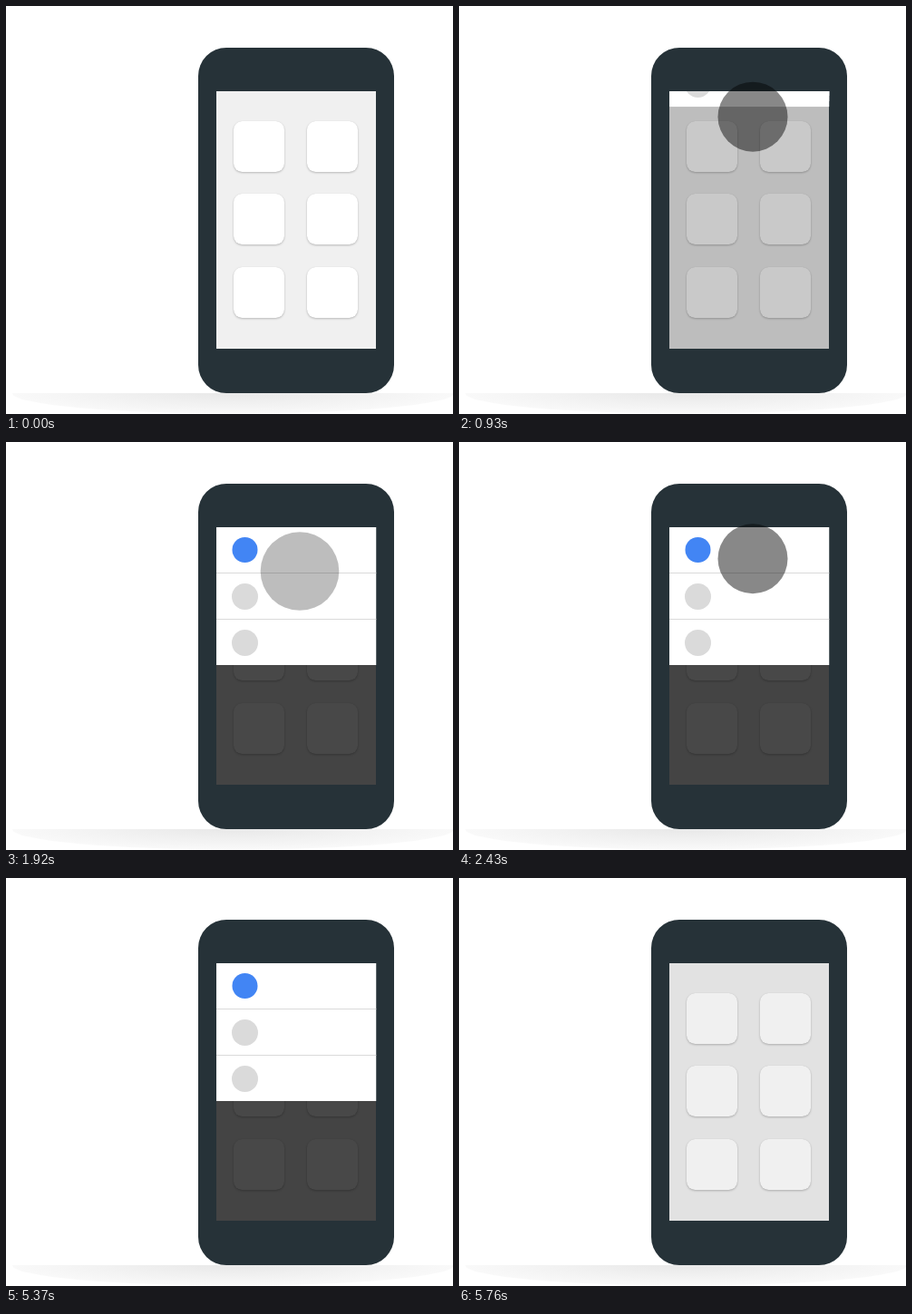
An HTML page that plays this animation: 493x450 px, repeating every 6.06 s.

```html
<!DOCTYPE html>
<html lang="en">
<head>
<meta charset="utf-8">
<title>Pull-down notifications</title>
<style>
  html, body { margin: 0; width: 100%; height: 100%; overflow: hidden; background: #fff; }
  svg { display: block; }
  .tile { fill: #fff; filter: drop-shadow(0 1px 1px rgba(0, 0, 0, .22)) drop-shadow(0 0 .5px rgba(0, 0, 0, .12)); }
</style>
</head>
<body>
<svg width="493" height="450" viewBox="0 0 493 450">
  <defs>
    <radialGradient id="ground">
      <stop offset="0" stop-color="#e8e8e8"/>
      <stop offset="1" stop-color="#f9f9f9"/>
    </radialGradient>
    <clipPath id="floor"><rect y="427" width="493" height="23"/></clipPath>
    <clipPath id="screen"><rect x="232" y="94" width="176.5" height="284"/></clipPath>
  </defs>
  <ellipse cx="250.5" cy="427" rx="243.5" ry="22.5" fill="url(#ground)" clip-path="url(#floor)"/>
  <rect x="212" y="46" width="216" height="381" rx="31" fill="#263238"/>
  <rect x="232" y="94" width="176" height="284" fill="#f0f0f0"/>
  <g id="tiles"></g>
  <rect id="dim" x="232" y="94" width="176" height="284"/>
  <g id="rows" clip-path="url(#screen)"></g>
  <circle id="touch" cx="324"/>
</svg>
<script>
const LOOP = 6060, STEP = 30;
const ROW_TOPS = [93, 144, 195];
const PANEL_HEIGHT = 152;
const $ = id => document.getElementById(id);

function add(parent, tag, attrs) {
  const el = document.createElementNS('http://www.w3.org/2000/svg', tag);
  for (const key in attrs) el.setAttribute(key, attrs[key]);
  return parent.appendChild(el);
}

for (const y of [127, 207, 288])
  for (const x of [251, 332])
    add($('tiles'), 'rect', { x, y, width: 56, height: 56, rx: 9.5, class: 'tile' });

// Lower rows lie over the upper ones while the list is folded.
const rows = ROW_TOPS.map((y, i) => {
  const row = add($('rows'), 'g', {});
  add(row, 'rect', { x: 232, y, width: 176.5, height: 51, fill: '#fff' });
  if (i) add(row, 'rect', { x: 232, y, width: 176.5, height: 1, fill: '#dadada' });
  add(row, 'circle', {
    cx: 263.5, cy: y + (i ? 26.5 : 26), r: i ? 14.5 : 14, fill: i ? '#dadada' : '#4285f4'
  });
  return row;
});

const linear = u => u;
const easeIn = u => u ** 3.36;
const easeOut = u => 1 - (1 - u) ** 3;
const easeInOut = u => (1 - Math.cos(Math.PI * u)) / 2;

// Each track entry is [time, value, easing towards this entry].
const tracks = {
  pressure: [
    [0, 0], [450, 0], [480, .54], [510, .8], [540, 1], [1080, 1], [1110, .53], [1320, 0, easeOut],
    [1890, 0], [1920, .56], [1950, .56], [2040, 1], [2490, 1], [2520, .54], [2760, 0, easeOut]
  ],
  touchY: [
    [0, 75], [480, 75], [1110, 221, easeIn], [1320, 221],
    [1350, 142.5], [1950, 142.5], [2520, 118, easeIn]
  ],
  panelHeight: [
    [0, -32], [480, -32], [1110, 120, easeIn], [1320, PANEL_HEIGHT, easeOut],
    [5370, PANEL_HEIGHT], [5760, -17, easeInOut]
  ],
  dim: [
    [0, 0], [480, 0], [1110, .65, easeIn], [1320, .717, easeOut],
    [5370, .717], [5760, .058, easeInOut]
  ]
};

function valueAt(track, t) {
  const next = track.findIndex(key => key[0] > t);
  if (next < 0) return track[track.length - 1][1];
  const [t0, from] = track[next - 1];
  const [t1, to, ease = linear] = track[next];
  return from + (to - from) * ease((t - t0) / (t1 - t0));
}

function draw(t) {
  const pressure = valueAt(tracks.pressure, t);
  const folded = PANEL_HEIGHT - valueAt(tracks.panelHeight, t);

  rows.forEach((row, i) =>
    row.setAttribute('transform', `translate(0 ${-folded * (i + 1) / rows.length})`));
  $('dim').setAttribute('opacity', valueAt(tracks.dim, t));
  $('touch').setAttribute('cy', valueAt(tracks.touchY, t));
  $('touch').setAttribute('r', 49.5 - 11 * pressure);
  $('touch').setAttribute('opacity', .465 * pressure);
  // A fully folded list leaves nothing on the screen.
  $('rows').setAttribute('visibility', folded < PANEL_HEIGHT ? 'visible' : 'hidden');
}

const start = performance.now();
function tick() {
  const elapsed = (performance.now() - start + 1) % LOOP;
  draw(Math.floor(elapsed / STEP) * STEP);
  requestAnimationFrame(tick);
}
draw(0);
requestAnimationFrame(tick);
</script>
</body>
</html>
```
